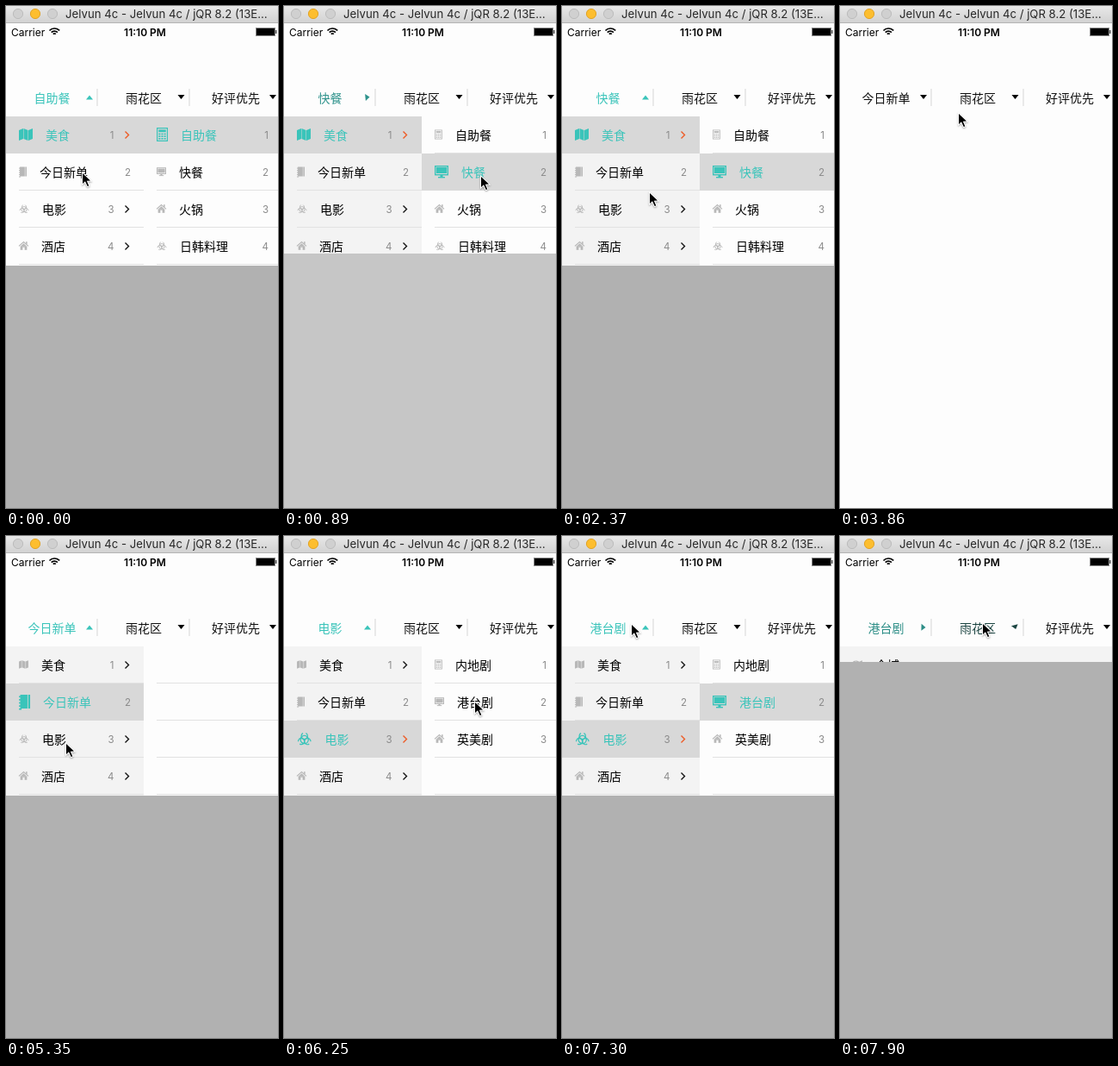
Animation of 316x582 px, one loop 8 s. Source, as an HTML page with a canvas:

```html
<!DOCTYPE html>
<html lang="zh">
<head>
<meta charset="utf-8">
<title>Drop-down menu</title>
<style>
html, body { margin: 0; width: 100%; height: 100%; overflow: hidden; background: #fdfdfd; }
canvas { display: block; width: 316px; height: 582px; }
</style>
</head>
<body>
<canvas id="stage"></canvas>
<script>
const W = 316, H = 582, LOOP = 8000, STEP = 149.05;
const MENU_Y = 128, ROW = 43, TABLE_H = 173, SPLIT = 160, FADE = 200;
const TEAL = [58, 196, 186], INK = 16;
const GREY = '#b8b8b8', LINE = '#e2e2e2', PICK = '#d8d8d8', PAPER = '#fdfdfd', SHADE = '#f3f3f3';
const LATIN = 'Inter, "Liberation Sans", sans-serif';
const HAN = '14px "Noto Sans CJK SC", "Noto Sans CJK", sans-serif';

const canvas = document.getElementById('stage');
const dpr = window.devicePixelRatio || 1;
canvas.width = W * dpr;
canvas.height = H * dpr;
const c = canvas.getContext('2d');

// The first menu starts open and flips at each of these times.
const TOGGLES = [830, 1680, 3060, 4400, 6340, 7090];
// Here the second menu takes its place.
const SWITCH = 7830;

// What is chosen from each time on.
const CHOICES = [
  { at: 0, title: '自助餐', left: 0, item: 0 },
  { at: 830, title: '快餐', left: 0, item: 1 },
  { at: 3060, title: '今日新单', left: 1 },
  { at: 5600, title: '电影', left: 2 },
  { at: 6340, title: '港台剧', left: 2, item: 1 }
];

// Pointer moves: first step, last step, destination.
const MOVES = [
  [0, 4, 229, 197], [6, 11, 79, 112], [12, 15, 96, 313], [15, 16, 102, 216], [16, 20, 133, 192],
  [22, 26, 138, 124], [26, 29, 75, 106], [30, 34, 76, 232], [35, 36, 70, 240], [38, 42, 222, 192],
  [43, 46, 81, 102], [49, 52, 166, 101]
];

const icons = {
  map() {
    for (const i of [-1, 0, 1]) {
      const x = i * 5.5, tilt = i ? -1 : 1;
      poly([x - 2.5, -6 - tilt, x + 2.5, -6 + tilt, x + 2.5, 6 + tilt, x - 2.5, 6 - tilt]);
    }
  },
  book() {
    c.fillRect(-5, -8, 8.4, 16);
    c.fillRect(4.2, -8, 2.3, 16);
    for (let y = -6.5; y < 8; y += 3.6) c.fillRect(-6.5, y, 3, 1.6);
  },
  hazard() {
    c.lineWidth = 1.3;
    for (let i = 0; i < 3; i++) {
      const a = -Math.PI / 2 + i * Math.PI * 2 / 3;
      arc(Math.cos(a) * 4.2, 1 + Math.sin(a) * 4.2, 3.6, a + 0.5, a - 0.5 + Math.PI * 2).stroke();
    }
    arc(0, 1, 4.6).stroke();
    arc(0, 1, 1.3).fill();
  },
  house() {
    c.lineWidth = 1.8;
    line([-8, 0.5, 0, -6.5, 8, 0.5]).stroke();
    poly([-5.6, 1, 0, -4, 5.6, 1]);
    c.fillRect(3.8, -7, 2.2, 4);
    for (const x of [-5.6, 1.6]) c.fillRect(x, 0.8, 4, 6.2);
    c.fillRect(-2, 0.8, 4, 1.7);
  },
  calc() {
    c.lineWidth = 1.2;
    c.strokeRect(-5.9, -7.4, 11.8, 14.8);
    c.fillRect(-4.2, -5.6, 8.4, 2.8);
    for (let i = 0; i < 9; i++) c.fillRect(-4.2 + i % 3 * 3.1, -1.4 + Math.floor(i / 3) * 2.7, 2.1, 1.7);
  },
  screen() {
    c.lineWidth = 1.4;
    c.strokeRect(-7.3, -6.3, 14.6, 10);
    c.fillRect(-6, -5, 12, 7);
    c.fillRect(-1.5, 4, 3, 2.5);
    c.fillRect(-4, 6, 8, 1.4);
  }
};
const ICON_WIDTH = { map: 11, book: 9, hazard: 12, house: 11, calc: 9, screen: 11 };
const GROW = 16 / 11;

const KINDS = ['美食', '今日新单', '电影', '酒店'];
const KIND_ICONS = ['map', 'book', 'hazard', 'house'];
const ITEMS = [['自助餐', '快餐', '火锅', '日韩料理'], [], ['内地剧', '港台剧', '英美剧']];
const ITEM_ICONS = ['calc', 'screen', 'house', 'hazard'];
const AREAS = ['全城', '芙蓉区', '雨花区', '天心区'];

const clamp = v => Math.max(0, Math.min(1, v));
const smooth = p => p * p * (3 - 2 * p);
const cubic = p => p < 0.5 ? 4 * p ** 3 : 1 - 4 * (1 - p) ** 3;
const tint = a => `rgb(${TEAL.map(v => Math.round(INK + (v - INK) * a))})`;

function line(p) {
  c.beginPath();
  for (let i = 0; i < p.length; i += 2) c.lineTo(p[i], p[i + 1]);
  return c;
}
function poly(p) { line(p).closePath(); c.fill(); }
function arc(x, y, r, from = 0, to = Math.PI * 2) {
  c.beginPath();
  c.arc(x, y, r, from, to);
  return c;
}
function rect(x, y, w, h, color) { c.fillStyle = color; c.fillRect(x, y, w, h); }

function text(s, x, y, font, color, align = 'left') {
  c.font = font;
  c.fillStyle = color;
  c.textAlign = align;
  c.fillText(s, x, y);
}

function row(x, width, i, label, name, on, detailX) {
  const y = MENU_Y + ROW * i, size = ICON_WIDTH[name] * (on ? GROW : 1);
  if (on) rect(x, y, width, ROW, PICK);
  c.save();
  c.translate(x + 15 + size / 2, y + 21);
  const scale = (on ? GROW : 1) * 11 / 16;
  c.scale(scale, scale);
  c.fillStyle = c.strokeStyle = on ? tint(1) : GREY;
  icons[name]();
  c.restore();
  text(label, x + 30 + size, y + 27, HAN, on ? tint(1) : '#000');
  if (detailX) text(i + 1, detailX, y + 26, '11.5px ' + LATIN, '#8a8a8a', 'right');
}

function table(x, width, color) {
  rect(x, MENU_Y, width, TABLE_H, color);
  for (let i = 1; i <= 4; i++) rect(x + 15, MENU_Y + ROW * i - 1, width - 15, 1, LINE);
}

function chevron(i, on) {
  const y = MENU_Y + ROW * (i + 0.5);
  c.strokeStyle = on ? '#ee5a24' : '#111';
  c.lineWidth = 1.4;
  line([138.5, y - 4, 142.5, y, 138.5, y + 4]).stroke();
}

function foodMenu({ at, left, item }) {
  table(0, SPLIT, at ? SHADE : PAPER);
  table(SPLIT, W - SPLIT, PAPER);
  KINDS.forEach((label, i) => {
    const more = ITEMS[i] === undefined || ITEMS[i].length > 0;
    row(0, SPLIT, i, label, KIND_ICONS[i], i === left, more ? 125.5 : 145);
    if (more) chevron(i, i === left);
  });
  ITEMS[left].forEach((label, i) => row(SPLIT, W - SPLIT, i, label, ITEM_ICONS[i], i === item, 305));
}

function areaMenu() {
  table(0, W, SHADE);
  AREAS.forEach((label, i) => row(0, W, i, label, 'map', i === 2));
}

function tab(label, center, arrowX, open) {
  text(label, center, 112, HAN, tint(open), 'center');
  c.save();
  c.translate(arrowX, 105.5 + open * 0.5);
  c.rotate(-Math.PI * open * open);
  c.fillStyle = open ? tint(open) : '#000';
  poly([-4, -2.5, 4, -2.5, 0, 2.5]);
  c.restore();
}

function windowBar() {
  const g = c.createLinearGradient(0, 0, 0, 19);
  g.addColorStop(0, '#e8e8e8');
  g.addColorStop(1, '#d2d2d2');
  rect(0, 0, W, 19, g);
  rect(0, 19, W, 1, '#b4b4b4');
  c.lineWidth = 1;
  for (let i = 0; i < 3; i++) {
    c.fillStyle = i === 1 ? '#fdbe2f' : '#d0d0d0';
    c.strokeStyle = i === 1 ? '#e2a325' : '#bcbcbc';
    arc(14 + 20 * i, 9, 5.6).fill();
    c.stroke();
  }
  text('Jelvun 4c - Jelvun 4c / jQR 8.2 (13E…', 69, 14, '13.2px ' + LATIN, '#282828');
}

function statusBar() {
  text('Carrier', 6, 34.5, '12px ' + LATIN, '#000');
  text('11:10 PM', 161.5, 34.5, '600 12px ' + LATIN, '#000', 'center');
  c.strokeStyle = '#000';
  c.lineWidth = 1.7;
  for (const r of [2, 4.9, 8]) arc(56.3, 34, r, -Math.PI * 0.76, -Math.PI * 0.24).stroke();
  rect(290, 25, 23, 10, '#8c8c8c');
  rect(291, 26, 21, 8, '#000');
  rect(313, 28, 1.5, 4, '#555');
}

function pointer(k) {
  let [x, y] = [89, 193];
  for (const [from, to, toX, toY] of MOVES) {
    const p = smooth(clamp((k - from) / (to - from)));
    x += (toX - x) * p;
    y += (toY - y) * p;
  }
  c.save();
  c.translate(x, y);
  c.shadowColor = 'rgba(0,0,0,.35)';
  c.shadowBlur = 2 * dpr;
  c.shadowOffsetY = dpr;
  c.strokeStyle = '#fff';
  c.lineWidth = 2;
  line([0, 1, 0, 13, 3, 10.3, 5.7, 16, 7.3, 15.4, 4.8, 9.8, 9, 9.6]).closePath();
  c.stroke();
  c.shadowColor = 'transparent';
  c.fillStyle = '#000';
  c.fill();
  c.restore();
}

function draw(k) {
  const t = Math.max(0, STEP * k - 10);
  const flips = TOGGLES.filter(at => at <= t);
  const p = flips.length ? clamp((t - flips[flips.length - 1]) / FADE) : 1;
  const shown = flips.length % 2 ? 1 - p : p;
  const area = clamp((t - SWITCH) / FADE);
  const choice = CHOICES.filter(s => s.at <= t).pop();

  c.setTransform(dpr, 0, 0, dpr, 0, 0);
  rect(0, 0, W, H, PAPER);
  windowBar();
  statusBar();
  for (const x of [106, 213]) rect(x - 0.5, 96, 1, 20, '#d6d6d6');
  tab(choice.title, 53.5, 97, shown * (1 - area));
  tab('雨花区', 160, 203.5, area);
  tab('好评优先', 267, 310, 0);

  if (shown > 0) {
    rect(0, MENU_Y, W, H - MENU_Y, `rgba(0,0,0,${0.3 * shown})`);
    c.save();
    c.beginPath();
    c.rect(0, MENU_Y, W, Math.round(TABLE_H * cubic(area || shown)));
    c.clip();
    if (area) areaMenu();
    else foodMenu(choice);
    c.restore();
  }
  pointer(k);
}

// The picture refreshes in even steps rather than continuously.
function frame() {
  draw(Math.floor((performance.now() % LOOP + 20) / STEP));
  requestAnimationFrame(frame);
}
frame();
</script>
</body>
</html>
```
